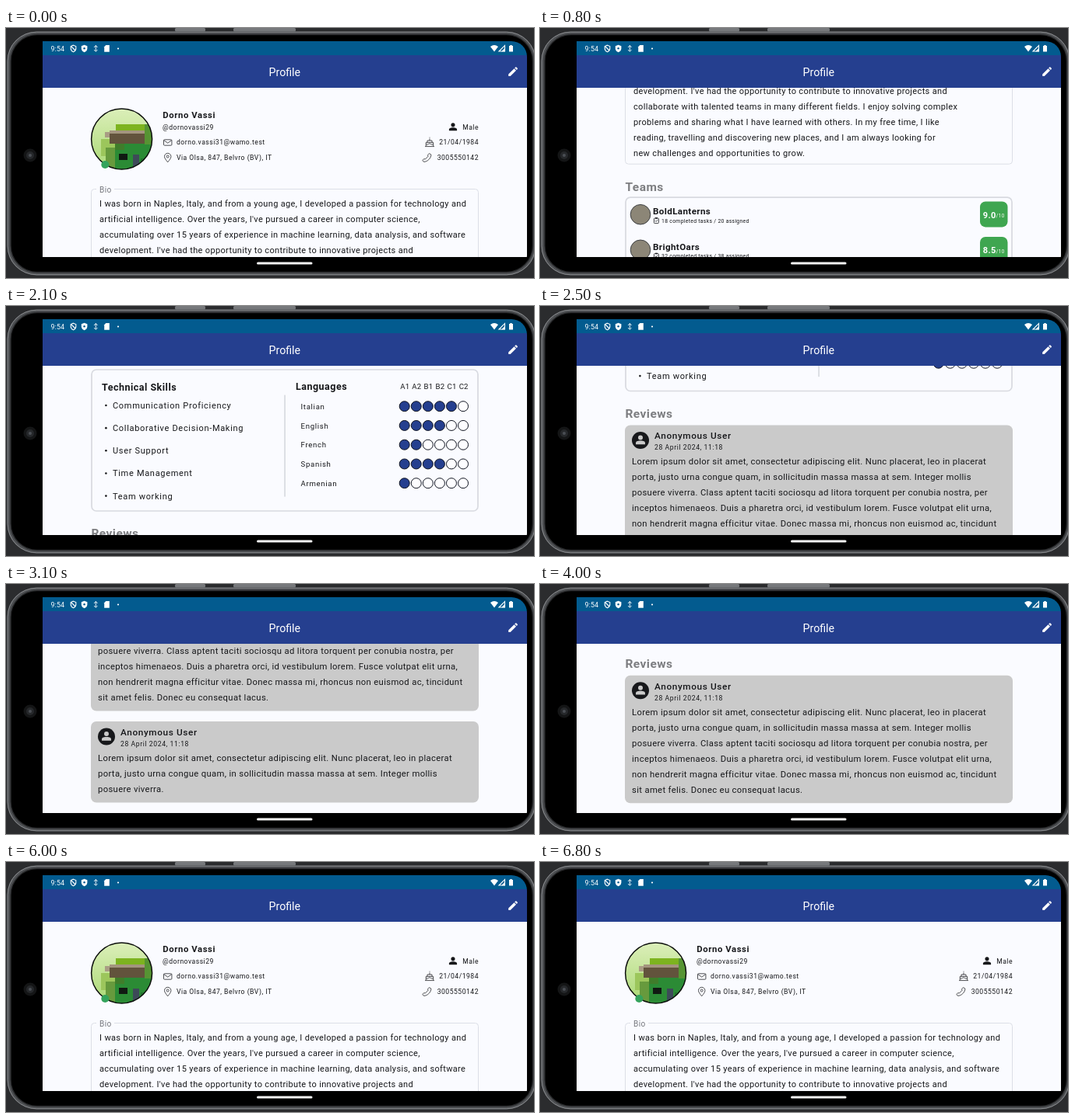
An HTML page that plays this animation: 678x322 px, repeating every 6900 ms.

```html
<!DOCTYPE html>
<html lang="en">
<head>
<meta charset="utf-8">
<title>Profile</title>
<style>
html, body { margin: 0; width: 100%; height: 100%; overflow: hidden; background: #2b2c2e; }
svg { display: block; width: 678px; height: 322px; }
text { font-family: Roboto, "Liberation Sans", sans-serif; white-space: pre; }
</style>
</head>
<body>
<svg id="stage" viewBox="0 0 678 322" xmlns="http://www.w3.org/2000/svg"></svg>
<script>
const LOOP = 6900, STEP = 100;
const INK = '#17181b', LINE = '#d8dae0', BLUE = '#253f8f';

// Helpers returning markup
const text = (x, y, str, size, o = {}) =>
  `<text x="${x}" y="${y}" font-size="${size}" fill="${o.fill || INK}" font-weight="${o.weight || 400}" ` +
  `letter-spacing="${o.gap || 0}" text-anchor="${o.anchor || 'start'}">${str}</text>`;
const rect = (x, y, w, h, fill, rx = 0, extra = '') =>
  `<rect x="${x}" y="${y}" width="${w}" height="${h}" rx="${rx}" fill="${fill}" ${extra}/>`;
const circle = (x, y, r, fill, extra = '') =>
  `<circle cx="${x}" cy="${y}" r="${r}" fill="${fill}" ${extra}/>`;
const path = (d, fill, extra = '') => `<path d="${d}" fill="${fill}" ${extra}/>`;
const stroke = (color, width = 1) => `stroke="${color}" stroke-width="${width}"`;
const panel = (y, h) => rect(110, y, 496, h, 'none', 6, stroke(LINE, 1.7));
const heading = (y, str) => text(109.5, y + 5.5, str, 15.5, { weight: 700, gap: 0.45, fill: '#7d7e81' });
const person = (x, y, s, fill) =>
  `<g transform="translate(${x} ${y}) scale(${s})">` + circle(0, -2.6, 2.6, fill) +
  path('M-5.2 5v-1.6C-5.2 1.2-1.8.9 0 .9s5.2.3 5.2 2.5V5z', fill) + '</g>';

function profile() {
  const small = { gap: 0.5 }, right = { gap: 0.5, anchor: 'end' };
  const thin = stroke('#3a3b3f', 0.9);
  const picture =
    rect(109, 103, 80, 80, 'url(#meadow)') +
    rect(122, 143, 19, 22, '#9cc65c') + rect(128, 154, 14, 30, '#679a3d') +
    rect(141, 124, 40, 10, '#7db31f') + rect(127, 134, 14, 7, '#a99d84') +
    rect(133, 132, 54, 17, '#62533c') + rect(133, 132, 46, 4, '#a3957e') +
    rect(140, 149, 48, 35, '#2b8b35') + rect(140, 149, 12, 8, '#3f7d2b') +
    rect(178, 124, 10, 26, '#569433') + rect(145, 162, 11, 8, '#101a12') +
    rect(163, 163, 8, 20, '#3d4a58') + rect(173, 168, 12, 15, '#23702e');
  return `<g clip-path="url(#round)">${picture}</g>` +
    circle(148.6, 143, 39, 'none', stroke('#0c0f0c', 1.5)) + circle(127.3, 176, 5, '#34a35c') +
    text(201.3, 116.2, 'Dorno Vassi', 11.3, { weight: 700, gap: 0.6 }) +
    text(201, 130.6, '@dornovassi29', 8.6, small) +
    text(219, 150.3, 'dorno.vassi31@wamo.test', 8.6, small) +
    text(219, 170.2, 'Via Olsa, 847, Belvro (BV), IT', 8.6, small) +
    text(607, 130.6, 'Male', 8.6, right) +
    text(607, 150.3, '21/04/1984', 8.6, right) +
    text(607, 170.2, '3005550142', 8.6, right) +
    rect(202.5, 143.8, 10.4, 7.4, 'none', 1, thin) + path('M202.8 144.6l4.9 3.6 4.9-3.6', 'none', thin) +
    path('M207.7 172.8c-2.4-3.1-4.2-5-4.2-7.3a4.2 4.2 0 0 1 8.4 0c0 2.3-1.8 4.2-4.2 7.3z', 'none', thin) +
    circle(207.7, 165.5, 1.5, 'none', thin) +
    person(574, 127.4, 0.98, INK) +
    path('M538 152.6h12M539.3 152v-4.600h9.400v4.600M541 147.400v-2.400h6v2.400M544 145v-2.500M539.300 149.500q1.600 1.500 3.100 0t3.100 0 3.200 0M544 141.600v-.900', 'none', thin) +
    path('M536.300 172.300c4.500.4 9.600-4.600 9.600-9.200l-2.400-1.500-2 2.100.6 1.500-3.800 3.900-1.600-.6-1.700 1.900z', 'none', thin);
}

const BIO = [
  'I was born in Naples, Italy, and from a young age, I developed a passion for technology and',
  'artificial intelligence. Over the years, I\'ve pursued a career in computer science,',
  'accumulating over 15 years of experience in machine learning, data analysis, and software',
  'development. I\'ve had the opportunity to contribute to innovative projects and',
  'collaborate with talented teams in many different fields. I enjoy solving complex',
  'problems and sharing what I have learned with others. In my free time, I like',
  'reading, travelling and discovering new places, and I am always looking for',
  'new challenges and opportunities to grow.'
];

function bio() {
  return path('M116 207.500h-2.500a4 4 0 0 0-4 4V376a4 4 0 0 0 4 4H602.500a4 4 0 0 0 4-4V211.500a4 4 0 0 0-4-4H139',
      'none', stroke('#dcdfe6', 1)) +
    text(120, 211.6, 'Bio', 10, { fill: '#74767c', gap: 0.4 }) +
    BIO.map((line, i) => text(120, 230.4 + 19.9 * i, line, 11, { gap: 0.344 })).join('');
}

const GREEN = '#3fa650', RED = '#b44a30', OLIVE = '#bcb24d';
const TEAMS = [
  ['BoldLanterns', 18, 20, '9.0', GREEN, '#8c8677'],
  ['BrightOars', 32, 38, '8.5', GREEN, '#8c8677'],
  ['FreshTactic', 3, 40, '4.0', RED, '#93b9e0'],
  ['CosmicGlimpses', 60, 80, '7.0', OLIVE, '#6e4a3c'],
  ['TerrainSeekers', 11, 30, '6.0', OLIVE, '#93b9e0']
];

function teams() {
  return heading(409, 'Teams') + panel(423, 226.6) + TEAMS.map(([name, done, total, score, color, mark], i) => {
    const y = 445 + 45.6 * i;
    return circle(129, y, 12.8, mark, stroke('#33363a', 0.9)) +
      text(145, y, name, 11.6, { weight: 700, gap: 0.4 }) +
      rect(146.4, y + 4.8, 6, 6.6, 'none', 1, stroke(INK, 0.8)) +
      rect(148, y + 3.9, 2.8, 1.5, INK) + path(`M147.800 ${y + 8}l1.200 1.300 2.200-2.600`, 'none', stroke(INK, 0.7)) +
      text(156, y + 10.7, `${done} completed tasks / ${total} assigned`, 6.8, { gap: 0.32 }) +
      rect(565, y - 16.8, 35.5, 33, color, 7) +
      text(568.8, y + 4.6, score, 11, { weight: 700, gap: 0.3, fill: '#fff' }) +
      text(585.4, y + 4.2, '/10', 6.8, { gap: 0.3, fill: '#f4f4ee' });
  }).join('');
}

const SKILLS = ['Communication Proficiency', 'Collaborative Decision-Making', 'User Support', 'Time Management', 'Team working'];
const LANGUAGES = [['Italian', 5], ['English', 4], ['French', 2], ['Spanish', 4], ['Armenian', 1]];
const LEVELS = ['A1', 'A2', 'B1', 'B2', 'C1', 'C2'];

function skills() {
  const top = 692.6, title = { weight: 700, gap: 0.5 };
  const column = i => 511.7 + 15.07 * i;
  let out = heading(678.6, 'Skills') + panel(top, 182) +
    text(123, top + 27, 'Technical Skills', 12.5, title) +
    text(372, top + 26, 'Languages', 12.5, title) +
    rect(357.2, top + 32.6, 1.7, 131, LINE);
  SKILLS.forEach((name, i) => {
    const y = top + 46 + 29.15 * i;
    out += circle(128.4, y, 1.3, INK) + text(137, y + 4, name, 11, { gap: 0.69 });
  });
  LEVELS.forEach((name, i) => {
    out += text(column(i) + 0.6, top + 24.6, name, 9.6, { anchor: 'middle', gap: 0.2 });
  });
  LANGUAGES.forEach(([name, level], row) => {
    const y = top + 47.2 + 24.75 * row;
    out += text(378.5, y + 3.6, name, 9.6, { gap: 0.7 });
    LEVELS.forEach((_, i) => {
      out += circle(column(i), y, 6.5, i < level ? BLUE : '#fdfdff', stroke('#101420', 1));
    });
  });
  return out;
}

const LOREM = [
  'Lorem ipsum dolor sit amet, consectetur adipiscing elit. Nunc placerat, leo in placerat',
  'porta, justo urna congue quam, in sollicitudin massa massa at sem. Integer mollis',
  'posuere viverra. Class aptent taciti sociosqu ad litora torquent per conubia nostra, per',
  'inceptos himenaeos. Duis a pharetra orci, id vestibulum lorem. Fusce volutpat elit urna,',
  'non hendrerit magna efficitur vitae. Donec massa mi, rhoncus non euismod ac, tincidunt',
  'sit amet felis. Donec eu consequat lacus.'
];

function review(top, lines) {
  return rect(109, top, 498, 44.5 + 20 * lines.length, '#cacaca', 7) +
    circle(129, top + 19.5, 11, INK) + person(129, top + 19, 1.15, '#cacaca') +
    text(147, top + 18, 'Anonymous User', 11.8, { weight: 500, gap: 0.63 }) +
    text(147, top + 32, '28 April 2024, 11:18', 8.6, { gap: 0.6 }) +
    lines.map((line, i) => text(118, top + 51 + 20 * i, line, 11.25, { gap: 0.35 })).join('');
}

function reviews() {
  return heading(903.6, 'Reviews') + review(918.6, LOREM) +
    review(1096.6, [...LOREM.slice(0, 2), 'posuere viverra.']);
}

function phone() {
  return rect(0, 0, 678, 322, '#2b2c2e') +
    rect(217, 0, 39, 4.5, '#77797c', 1.5) + rect(292, 0, 80, 4.5, '#77797c', 1.5) +
    rect(1.5, 4.5, 679, 314, '#4d4f52', 38) +
    rect(2.2, 5.2, 677.6, 312.6, 'none', 37, stroke('#8b8d90', 1)) +
    rect(6, 8.5, 670.5, 306, '#000', 34, stroke('#2a2b2d', 1.5)) +
    circle(31, 164, 8.5, '#141516') + circle(31, 164, 5, '#26282b') + circle(31, 164, 2, '#4b4e54');
}

function bars() {
  const white = '#fff', line = stroke(white, 1.1);
  return rect(47, 17, 622, 18.5, '#035b8f') + rect(47, 35, 622, 42, BLUE) +
    text(57.5, 29.7, '9:54', 8.8, { fill: white, gap: 0.2 }) +
    path('M86.500 22.200l3.300 1.300v2.700c0 2.400-1.500 3.800-3.300 4.600-1.800-.8-3.300-2.200-3.300-4.600v-2.700zM84 24l5 5', 'none', line) +
    path('M100.600 21.800l3.800 1.500v2.900c0 2.500-1.700 4.200-3.800 5-2.100-.8-3.800-2.500-3.800-5v-2.900z', white) +
    circle(100.6, 26.2, 1.2, '#035b8f') +
    path('M115.300 22.500v7M113 25l2.300-2.500 2.300 2.500M113 28.200l2.300 2 2.300-2', 'none', stroke(white, 0.9)) +
    path('M128.300 22h4.500v8.800h-6.600v-6.600z', white) + circle(144, 26.5, 1.1, white) +
    path('M622 24q5-4 10 0l-5 6.500z', white) +
    path('M640.500 22.500v7.500h-7.500z', 'none', line) + path('M640.800 25.500v4.800h-4.600z', white) +
    path('M646 22.900h1.300v-1h2.400v1h1.300v7.600h-5z', white) +
    text(357.8, 62.2, 'Profile', 14.2, { fill: white, anchor: 'middle' }) +
    path('M645.200 59.600v2.500h2.500l7.300-7.300-2.500-2.500zM656.700 53l-1 1-2.500-2.500 1-1q.6-.6 1.200 0l1.300 1.300q.6.600 0 1.200z', white);
}

document.getElementById('stage').innerHTML = `
<defs>
  <linearGradient id="meadow" x2="0" y2="1"><stop offset="0" stop-color="#dcefba"/><stop offset="1" stop-color="#a9d873"/></linearGradient>
  <clipPath id="round"><circle cx="148.6" cy="143" r="39"/></clipPath>
  <clipPath id="screen"><path d="M47 17H649a20 20 0 0 1 20 20V293a20 20 0 0 1-20 20H47z"/></clipPath>
  <clipPath id="view"><rect x="47" y="77" width="622" height="218"/></clipPath>
</defs>
${phone()}
<g clip-path="url(#screen)">
  ${rect(47, 77, 622, 218, '#fafbff')}
  <g clip-path="url(#view)"><g id="page">${profile()}${bio()}${teams()}${skills()}${reviews()}</g></g>
  ${bars()}
</g>
${rect(322, 301.5, 71.5, 3, '#f2f2f2', 1.5)}`;

// Scroll offsets over time, [ms, px]
const SCROLL = [[300, 0], [1300, 409.6], [1900, 610.6], [2100, 610.6], [2900, 919.6], [3500, 919.6], [4800, 559.6], [5900, 0]];
const ease = k => k * k * (3 - 2 * k);

function scrollAt(t) {
  const next = SCROLL.findIndex(([time]) => time > t);
  if (next < 1) return 0;
  const [t0, y0] = SCROLL[next - 1], [t1, y1] = SCROLL[next];
  return y0 + (y1 - y0) * ease((t - t0) / (t1 - t0));
}

const page = document.getElementById('page');
const start = performance.now();

function draw(now) {
  const t = Math.floor((Math.max(0, now - start) % LOOP) / STEP) * STEP;
  page.setAttribute('transform', `translate(0 ${-scrollAt(t).toFixed(2)})`);
  requestAnimationFrame(draw);
}
draw(start);
</script>
</body>
</html>
```
